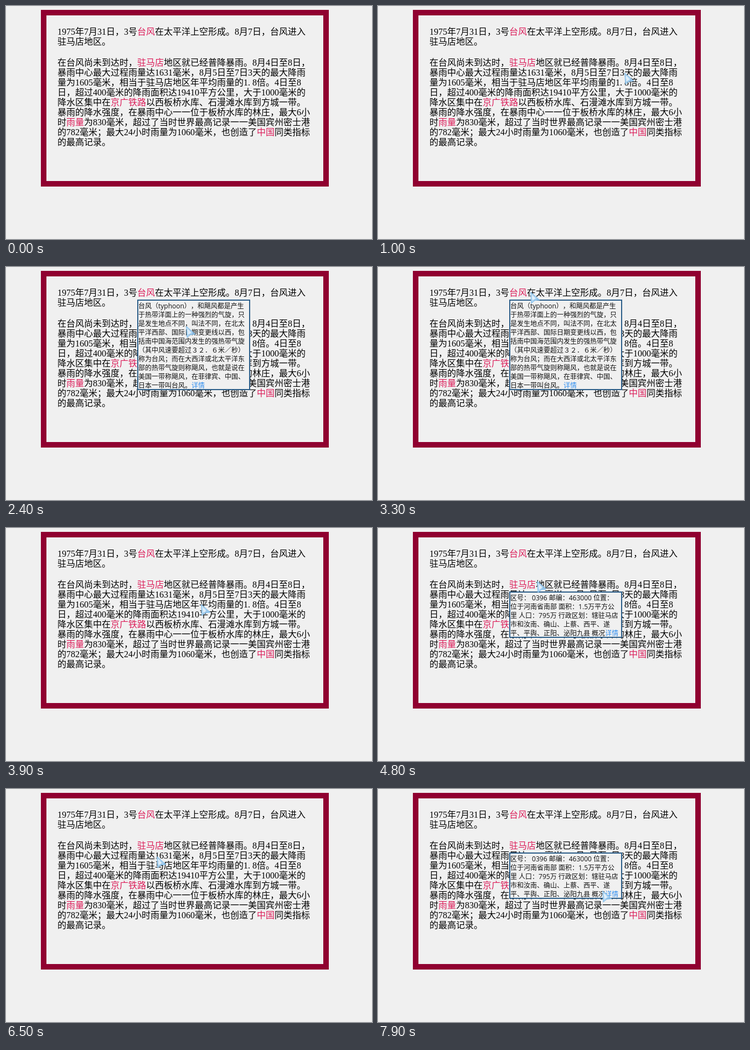
An HTML page for the animation above (8 s loop, 661x422 px).

```html
<!DOCTYPE html>
<html lang="zh-CN">
<head>
<meta charset="utf-8">
<title>台风</title>
<style>
  html, body { margin: 0; width: 100%; height: 100%; overflow: hidden; background: #f0f0f0; }
  body { position: relative; text-spacing-trim: space-all; font-kerning: none; white-space: pre; }
  .frame {
    position: absolute; left: 63px; top: 7px; width: 520px; height: 320px;
    box-sizing: border-box; border: 10px solid #900030;
  }
  .text {
    position: absolute; left: 93px; color: #000;
    font: 300 16px/18px "Liberation Serif", "Noto Sans CJK SC", "Noto Sans CJK", serif;
  }
  .text b { font-weight: inherit; color: #dc1e5a; }
  .text i { font-style: normal; letter-spacing: 4px; }
  .tip {
    position: absolute; left: 237px; width: 204px; box-sizing: border-box; visibility: hidden;
    padding-top: 2px; border: 2px solid #2d5f8a; background: #f0f0f0; color: #111;
    font: 12px/16px "Open Sans", "Noto Sans CJK JP", "Noto Sans CJK", sans-serif;
  }
  .tip b { font-weight: inherit; color: #2f8ef0; }
  #typhoon { top: 59px; height: 164px; }
  #city { top: 115px; height: 84px; }
  #cursor { position: absolute; left: 0; top: 0; width: 18px; height: 22px; }
</style>
</head>
<body><div class="frame"></div><div class="text" style="top:38px">1975年7月31日，3号<b>台风</b>在太平洋上空形成。8月7日，台风进入
驻马店地区。</div><div class="text" style="top:94px">在台风尚未到达时，<b>驻马店</b>地区就已经普降暴雨。8月4日至8日，
暴雨中心最大过程雨量达1631毫米，8月5日至7日3天的最大降雨
量为1605毫米，相当于驻马店地区年平均雨量的1<i>.</i>8倍。4日至8
日，超过400毫米的降雨面积达19410平方公里，大于1000毫米的
降水区集中在<b>京广铁路</b>以西板桥水库、石漫滩水库到方城一带。
暴雨的降水强度，在暴雨中心一一位于板桥水库的林庄，最大6小
时<b>雨量</b>为830毫米，超过了当时世界最高记录一一美国宾州密士港
的782毫米；最大24小时雨量为1060毫米，也创造了<b>中国</b>同类指标
的最高记录。</div><div class="tip" id="typhoon">台风（typhoon），和飓风都是产生
于热带洋面上的一种强烈的气旋，只
是发生地点不同，叫法不同，在北太
平洋西部、国际日期变更线以西，包
括南中国海范围内发生的强热带气旋
（其中风速要超过３２．６米／秒）
称为台风；而在大西洋或北太平洋东
部的热带气旋则称飓风，也就是说在
美国一带称飓风，在菲律宾、中国、
日本一带叫台风。<b>详情</b></div><div class="tip" id="city">区号： 0396 邮编：463000 位置：
位于河南省南部 面积：1.5万平方公
里 人口：795万 行政区划：辖驻马店
市和汝南、确山、上蔡、西平、遂
平、平舆、正阳、泌阳九县 概况<b>详情</b></div><svg id="cursor" viewBox="0 0 18 22"><defs><linearGradient id="ice" x1="0" y1="0" x2="1" y2="1"><stop offset="0" stop-color="#c3e2f8"/><stop offset=".5" stop-color="#b0d8f6"/><stop offset="1" stop-color="#5ea6e2"/></linearGradient></defs><path d="M.8 .8 L16.4 14.6 L8 15.6 L2 20.6 Z" fill="url(#ice)" fill-opacity=".9" stroke="#86bfea" stroke-width="1.2" stroke-linejoin="round"/><path d="M3 5 L9.5 12 L4 15.5 Z" fill="#f4faff" fill-opacity=".7"/></svg>
<script>
const LOOP = 8000, TICK = 100;

// pointer moves: leave and arrive in seconds, then where to
const moves = [
  [0, .1, 660, 325],
  [.2, .3, 636, 187],
  [.5, .8, 464, 129],
  [.9, 1.4, 264, 45],
  [2, 2.9, 411, 195],
  [2.9, 3, 244, 48],
  [3.2, 3.3, 275, 45],
  [3.3, 4.1, 365, 154],
  [4.1, 4.3, 265, 96],
  [4.7, 4.8, 287, 96],
  [4.8, 5.5, 273, 96],
  [5.6, 5.8, 407, 174],
  [5.9, 6.5, 272, 122],
  [6.5, 7.1, 237, 122],
  [7.2, 7.9, 405, 184]
];

const byId = id => document.getElementById(id);
const show = (id, on) => { byId(id).style.visibility = on ? "visible" : "hidden"; };
const ease = k => (1 - Math.cos(Math.PI * k)) / 2;

function pointAt(s) {
  let x = 661, y = 422;
  for (const [leave, arrive, toX, toY] of moves) {
    const k = ease(Math.min(1, Math.max(0, (s - leave) / (arrive - leave))));
    x += (toX - x) * k;
    y += (toY - y) * k;
  }
  return [Math.round(x), Math.round(y)];
}

function draw(time) {
  const s = Math.floor((time % LOOP) / TICK) * TICK / 1000;
  const [x, y] = pointAt(s);
  byId("cursor").style.transform = `translate(${x}px, ${y}px)`;
  show("typhoon", s >= 1.6 && s < 3.7);
  show("city", s >= 4.8 && s < 6.5 || s >= 7);
}

const start = performance.now();
function loop() {
  draw(performance.now() - start);
  requestAnimationFrame(loop);
}
loop();
</script>
</body>
</html>
```
